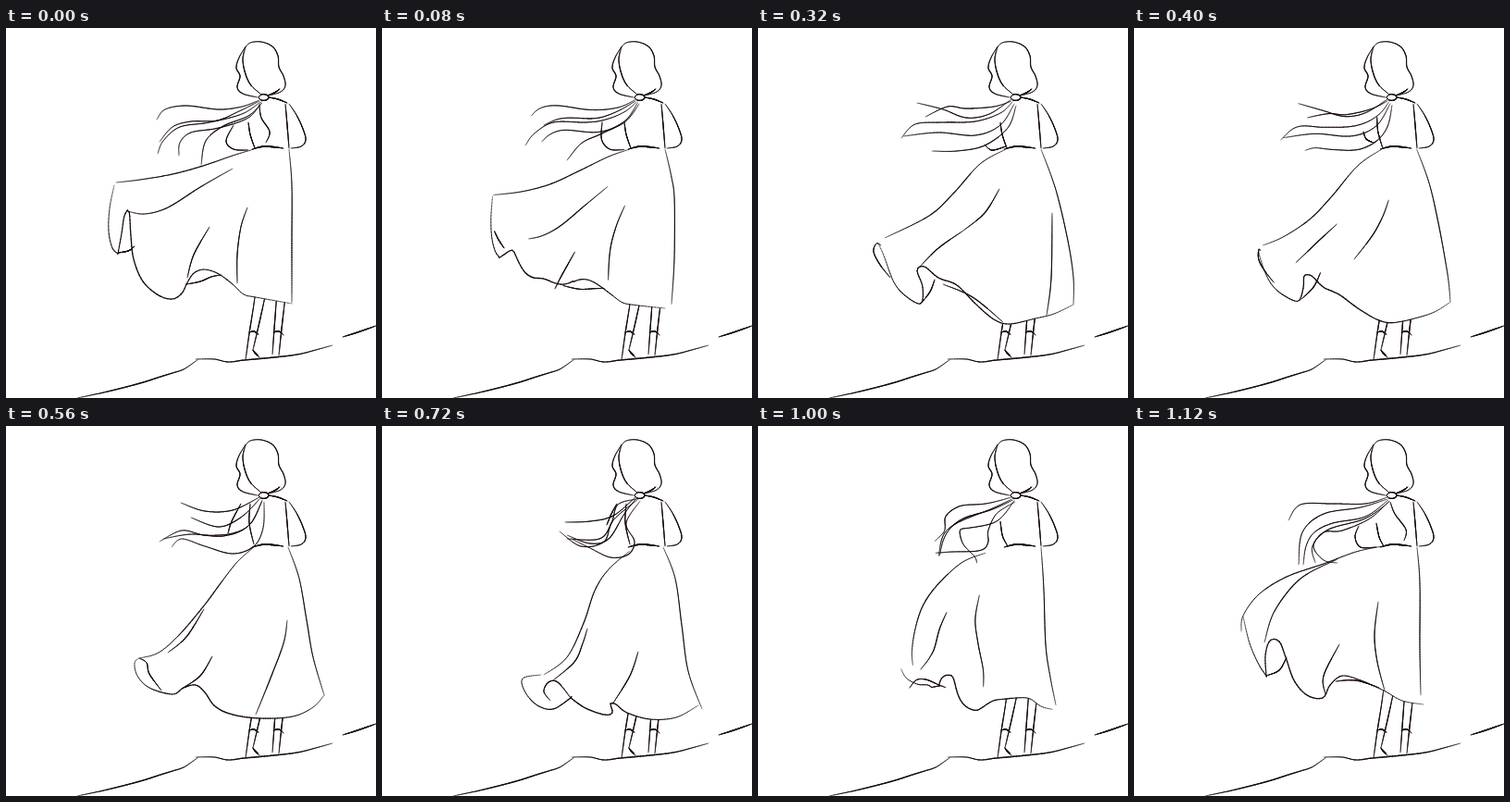
Animation of 400x400 px, one loop 1200 ms. Source, as an HTML page with a canvas:

```html
<!DOCTYPE html>
<html lang="en">
<head>
<meta charset="utf-8">
<title>Wind on the hill</title>
<style>
  html, body { margin: 0; width: 100%; height: 100%; overflow: hidden; background: #fff; }
  canvas { display: block; width: 400px; height: 400px; }
</style>
</head>
<body>
<canvas id="stage" width="400" height="400"></canvas>
<script>
const LOOP = 1200, STEP = 80, SAMPLES = 100;
const INK = '#14080e';
const ctx = document.getElementById('stage').getContext('2d');
ctx.lineCap = 'round';

// Smooth curve through "x,y x,y ...", resampled to evenly spaced points.
// A repeated point makes a corner.
function curve(text) {
  const p = text.split(' ').map(s => s.split(',').map(Number));
  const at = i => p[Math.max(0, Math.min(p.length - 1, i))];
  const dense = [p[0]];
  for (let i = 0; i < p.length - 1; i++) {
    const [a, b, c, d] = [at(i - 1), at(i), at(i + 1), at(i + 2)];
    for (let k = 1; k <= 14; k++) {
      const t = k / 14;
      dense.push([0, 1].map(j => b[j] + 0.5 * t * (c[j] - a[j] +
        t * (2 * a[j] - 5 * b[j] + 4 * c[j] - d[j] +
        t * (3 * (b[j] - c[j]) + d[j] - a[j])))));
    }
  }
  const len = [0];
  for (let i = 1; i < dense.length; i++)
    len.push(len[i - 1] + Math.hypot(dense[i][0] - dense[i - 1][0], dense[i][1] - dense[i - 1][1]));
  const total = len[len.length - 1], out = [];
  for (let n = 0, i = 1; n <= SAMPLES; n++) {
    const want = total * n / SAMPLES;
    while (i < len.length - 1 && len[i] < want) i++;
    const t = (want - len[i - 1]) / (len[i] - len[i - 1] || 1);
    out.push(mix(dense[i - 1], dense[i], Math.min(1, t)));
  }
  return out;
}

function mix(a, b, t) {
  return [a[0] + (b[0] - a[0]) * t, a[1] + (b[1] - a[1]) * t];
}

// Pen stroke, thin at both ends.
function stroke(pts, weight = 1.15) {
  ctx.strokeStyle = INK;
  for (let i = 1; i < pts.length; i++) {
    const u = (i - 0.5) / (pts.length - 1);
    ctx.lineWidth = 0.4 + (weight - 0.4) * Math.pow(Math.sin(Math.PI * u), 0.6);
    ctx.beginPath();
    ctx.moveTo(...pts[i - 1]);
    ctx.lineTo(...pts[i]);
    ctx.stroke();
  }
}

const legs = [
  '270,284 267,305 263,330 259,359', '281,286 274,318 267,348', '267,348 269,351 274,356',
  '263,329 268,328 273,331', '293,285 290,325 288,353', '302,290 298,325 295,354',
  '289,329 295,328 300,332'
].map(curve);

const figure = [
  '258,22 264,16 276,15 288,20 294,30 295,42 300,52 302,62 297,69 284,73',
  '259,20 252,32 249,43 253,52 250,64 256,71 272,75',
  '259,20 256,34 259,50 265,62 276,72',
  '296,66 290,70 283,73',
  '273,75 276,72 281,72 284,75 281,78 276,78 273,75',
  '284,75 294,77 304,81',
  '302,82 304,105 306,130',
  '306,82 314,94 321,109 324,121 319,128 308,130'
].map(curve);

const waist = curve('266,131 280,128 300,130');
const ground = [
  '77,400 110,393 145,384 167,377 180,373 192,369 204,361 208,358',
  '205,358 225,358 240,361 258,359 290,356 315,353 335,348 353,343',
  '364,334 380,329 400,322'
].map(curve);

const poses = [];
function pose(time, skirt, hair) {
  const trace = set => Object.fromEntries(Object.entries(set).map(([k, s]) => [k, curve(s)]));
  poses.push({ time, skirt: trace(skirt), hair: trace(hair) });
}

pose(0, {
  back: '268,131 245,138 213,149 180,158 145,164 119,167',
  hem: '117,170 112,195 111,220 115,238 121,244 121,244 125,222 128,203 133,198 135,225 138,250 148,274 165,289 180,293 190,287 195,277 195,277 203,265 215,261 230,266 245,277 257,288 270,291 309,298',
  side: '306,131 309,170 309,230 309,297',
  loop: '121,243 132,241 139,236',
  foldA: '131,198 150,201 175,194 210,172 245,152',
  foldB: '196,270 203,245 220,215',
  foldC: '250,276 250,245 254,215 261,194',
  under: '195,277 210,274 222,269 232,267'
}, {
  a: '274,78 255,85 230,88 195,84 172,88 163,99',
  b: '274,79 252,90 228,100 200,101 180,107 166,123',
  c: '275,80 255,93 220,102 188,107 170,122 164,136',
  d: '276,80 262,97 230,108 200,113 188,124 187,138',
  e: '277,81 262,95 235,106 216,122 211,148',
  f: '274,83 276,97 285,112 281,124',
  arm: '246,105 238,122 246,131 262,132',
  torso: '262,102 264,115 269,130'
});

pose(160, {
  back: '268,131 245,140 215,159 185,179 155,190 122,194',
  hem: '122,194 127,235 140,270 157,289 174,296 180,285 184,262 192,256 210,265 230,281 250,299 268,307 303,308',
  side: '306,131 317,160 323,185 323,250 317,300',
  loop: '122,196 122,214 125,240',
  foldA: '186,258 215,228 243,191',
  foldB: '178,294 189,284 197,269',
  foldC: '239,269 245,230 264,190',
  foldD: '309,188 313,235 311,304',
  under: '196,280 220,292 249,296'
}, {
  a: '274,77 255,87 220,89 185,83 168,86 160,91',
  b: '274,79 255,91 230,95 205,91 184,87',
  c: '275,80 262,92 230,103 185,97 160,106 146,118',
  d: '277,81 262,105 235,118 190,107 158,108',
  e: '279,83 265,108 240,122 215,127 189,138',
  arm: '230,98 237,119 246,131 262,131',
  torso: '262,102 264,115 269,130'
});

pose(320, {
  back: '268,131 240,147 212,178 185,203 137,227',
  hem: '130,233 136,246 147,275 160,290 176,298 178,280 172,262 180,258 195,270 215,278 235,298 255,315 272,320 300,314 320,309 341,299',
  side: '306,131 322,175 335,230 341,270 341,299',
  loop: '133,235 128,233 125,242 132,256 143,270',
  foldA: '175,258 195,238 222,219',
  foldB: '176,298 186,285 191,272',
  foldC: '222,219 245,200 261,174',
  foldD: '312,311 317,270 318,200',
  under: '200,277 232,291 265,318'
}, {
  a: '274,77 250,93 225,97 200,88 172,81',
  b: '274,79 255,85 225,87 205,85 181,96',
  c: '275,80 262,92 235,101 200,102 170,104 155,119',
  d: '277,82 262,105 235,116 195,113 157,117',
  e: '279,84 270,108 245,127 215,133 188,133',
  arm: '245,126 253,132 268,128',
  torso: '262,102 264,115 269,130'
});

pose(560, {
  back: '268,131 250,147 232,170 215,193 188,225 165,245 144,251',
  hem: '144,251 139,256 142,270 155,283 180,290 192,283 205,280 215,288 226,303 245,312 275,316 310,314 332,304 344,291',
  side: '305,131 317,165 325,210 332,250 344,291',
  loop: '144,251 152,256 155,268 168,286',
  foldA: '175,245 195,228 214,198',
  foldB: '190,284 210,270 223,249',
  foldC: '270,312 285,275 300,235 304,210'
}, {
  a: '274,77 245,91 215,92 189,83',
  b: '275,78 255,98 230,109 200,99',
  c: '277,80 265,105 245,116 215,118 190,113 166,125',
  d: '277,81 262,108 235,119 200,117 170,122',
  e: '279,82 278,110 268,130 245,138 215,130 190,122 179,131',
  arm: '254,84 244,103 240,116',
  torso: '264,84 263,105 268,128'
});

pose(720, {
  back: '268,135 245,155 230,178 218,213 200,250 175,269',
  hem: '172,269 152,273 155,288 168,302 185,306 204,294 204,294 220,305 240,312 249,310 247,300 253,301 265,310 290,317 318,315 342,302',
  side: '304,131 317,165 324,215 331,265 346,306',
  loop: '182,297 175,287 180,277 190,277 204,294',
  foldA: '185,275 208,255 217,235 222,219',
  foldC: '249,301 268,270 277,244'
}, {
  a: '274,77 250,97 225,103 198,104',
  b: '275,78 262,95 245,122 225,127 200,118',
  c: '277,79 250,102 240,125 215,130 192,114',
  d: '275,79 255,85 248,105 235,122 200,122',
  e: '279,81 264,105 273,125 266,139 247,142 225,132 205,122',
  arm: '254,84 248,95 243,107',
  torso: '264,84 263,105 268,128'
});

pose(880, {
  back: '235,141 212,153 193,180 185,210 188,245 193,277',
  hem: '173,291 180,298 195,296 207,287 222,299 222,299 227,285 234,282 240,305 255,315 275,308 300,297 312,306 321,309',
  side: '306,131 309,180 312,240 319,275 328,307',
  loop: '174,290 182,278 195,279 212,292 222,299',
  foldA: '193,278 204,272 207,260 196,230',
  foldC: '230,280 232,260 226,230 222,205 227,179',
  foldD: '295,261 303,285 314,306'
}, {
  a: '274,77 245,84 218,88 206,105 215,125 203,136',
  b: '275,79 240,100 212,115 204,136',
  c: '276,80 250,88 225,98 210,115 203,135',
  d: '278,80 262,103 235,108 225,112 235,125 247,138 245,148',
  e: '279,82 257,95 252,118 259,135 255,146 235,146 190,132',
  torso: '262,102 264,118 270,130'
});

pose(1120, {
  back: '268,130 240,136 205,149 165,163 135,182 118,205 116,222',
  hem: '118,206 125,235 135,258 143,270 143,270 142,248 147,232 157,233 164,250 173,275 187,291 204,294 212,280 225,270 245,275 270,286 290,297 313,301',
  side: '306,131 309,170 309,240 310,291',
  loop: '143,270 157,264 165,250',
  foldA: '141,234 152,200 180,165 220,144',
  foldB: '207,290 205,270 222,236',
  foldC: '271,286 263,255 260,225 264,190',
  under: '218,276 240,275 265,283'
}, {
  a: '274,77 250,84 215,84 180,85 167,102',
  b: '274,79 245,88 205,95 182,115 178,150',
  c: '275,80 250,98 215,105 195,115 186,130 183,150',
  d: '276,81 255,100 225,113 205,115 194,130 205,145 220,148',
  e: '276,82 250,100 210,112 193,130 196,148',
  f: '277,82 282,95 294,112 292,124',
  arm: '243,108 239,120 245,131 262,131',
  torso: '262,105 265,120 270,130'
});

function blend(a, b, t) {
  if (t === 0) return a;
  const out = {};
  for (const key in a)
    if (b[key]) out[key] = a[key].map((p, i) => mix(p, b[key][i], t));
  return out;
}

function draw(time) {
  let i = poses.length - 1;
  while (poses[i].time > time) i--;
  const a = poses[i], b = poses[(i + 1) % poses.length];
  const t = (time - a.time) / ((b.time || LOOP) - a.time);
  const skirt = blend(a.skirt, b.skirt, t), hair = blend(a.hair, b.hair, t);

  ctx.fillStyle = '#fff';
  ctx.fillRect(0, 0, 400, 400);
  legs.forEach(s => stroke(s, 1.2));

  // The skirt hides the tops of the legs.
  ctx.beginPath();
  [...skirt.back, ...skirt.hem, ...[...skirt.side].reverse()].forEach(p => ctx.lineTo(...p));
  ctx.fill();

  for (const key in skirt) stroke(skirt[key], key === 'hem' ? 1.3 : 1.1);
  for (const key in hair) stroke(hair[key], 1.05);
  figure.forEach(s => stroke(s));
  stroke(waist, 1.7);
  ground.forEach(s => stroke(s, 1.4));
}

let shown = -1;
const start = performance.now();
function tick() {
  const step = Math.floor(((performance.now() - start) % LOOP) / STEP);
  if (step !== shown) draw((shown = step) * STEP);
  requestAnimationFrame(tick);
}
tick();
</script>
</body>
</html>
```
